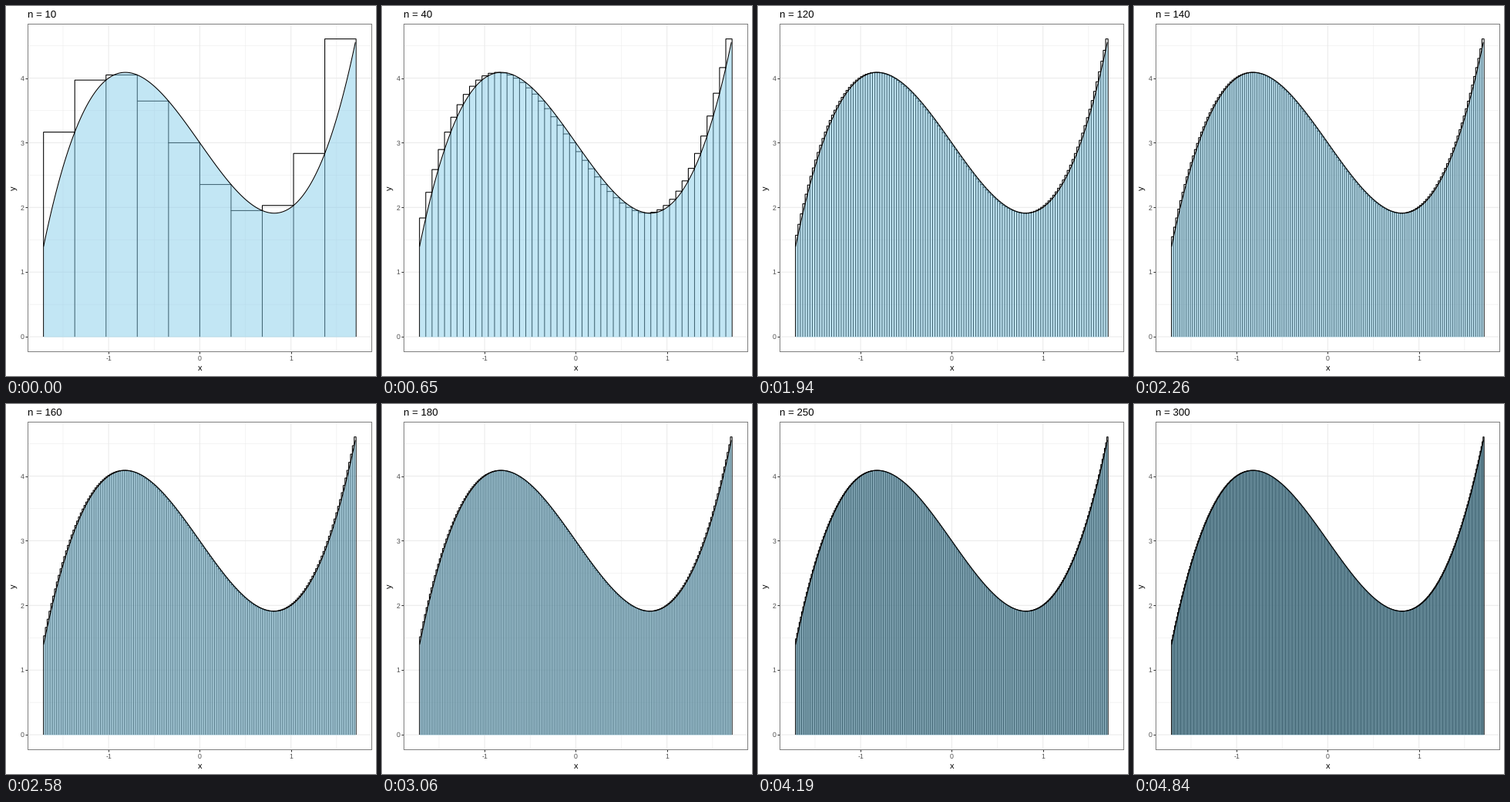
Write a matplotlib script that moves like this. It is 480 by 480 pixels and loops after 5 s.

```python
import numpy as np
import matplotlib.pyplot as plt
from matplotlib.animation import FuncAnimation

plt.rcParams["font.family"] = "Liberation Sans"
plt.rcParams["text.hinting"] = "none"
plt.rcParams["path.simplify"] = False

SIZE = 480
LEFT, RIGHT, TOP, BOTTOM = 28.4, 474.4, 23.4, 448.4
LINE = 1.07
EDGE = 1.7138
COUNTS = range(10, 311, 10)


def f(x):
    return x**3 - 2 * x + 3


def bar_lines(n):
    """Step outline of the right-hand sum, then the inner dividers."""
    edges = np.linspace(-EDGE, EDGE, n + 1)
    heights = f(edges[1:])
    xs = np.repeat(edges, 2)
    ys = np.concatenate([[0], np.repeat(heights, 2), [0]])
    inner = edges[1:-1]
    low = np.minimum(heights[:-1], heights[1:])
    gap = np.full(n - 1, np.nan)
    div_x = np.column_stack([gap, inner, inner]).ravel()
    div_y = np.column_stack([gap, np.zeros(n - 1), low]).ravel()
    return np.append(xs, div_x), np.append(ys, div_y)


fig = plt.figure(figsize=(SIZE / 72, SIZE / 72), dpi=72, facecolor="white")
ax = fig.add_axes([LEFT / SIZE, 1 - BOTTOM / SIZE,
                   (RIGHT - LEFT) / SIZE, (BOTTOM - TOP) / SIZE])
peak = f(EDGE)
ax.set_xlim(-1.1 * EDGE, 1.1 * EDGE)
ax.set_ylim(-0.05 * peak, 1.05 * peak)


def label(x, y, text, size, color="black", **kw):
    return fig.text(x / SIZE, 1 - y / SIZE, text, fontsize=size, color=color,
                    va="baseline", **kw)


def to_px(x, y):
    px, py = ax.transData.transform((x, y))
    return px, SIZE - py


# Panel: grid, ticks, border
ax.set_axisbelow(True)
ax.set_xticks([-1, 0, 1])
ax.set_yticks(range(5))
ax.set_xticks([-1.5, -0.5, 0.5, 1.5], minor=True)
ax.set_yticks(np.arange(0.5, 5), minor=True)
ax.tick_params(which="major", length=2.75, width=LINE, color="#333333",
               labelbottom=False, labelleft=False)
ax.tick_params(which="minor", length=0)
ax.grid(which="major", color="#ebebeb", lw=LINE)
ax.grid(which="minor", color="#ebebeb", lw=LINE / 2)
for axis in (ax.xaxis, ax.yaxis):
    for tick in axis.get_major_ticks() + axis.get_minor_ticks():
        tick.gridline.set_snap(False)
for spine in ax.spines.values():
    spine.set(color="#7f7f7f", linewidth=1)

for v in (-1, 0, 1):
    label(to_px(v, 0)[0], 459.9, str(v), 8.8, "#4d4d4d", ha="center")
for v in range(5):
    label(23.4, to_px(0, v)[1] + 3.2, str(v), 8.8, "#4d4d4d", ha="right")
label((LEFT + RIGHT) / 2, 472.6, "x", 11, ha="center")
label(13.9, (TOP + BOTTOM) / 2, "y", 11, ha="center", rotation=90,
      rotation_mode="anchor")
title = label(LEFT - 0.2, 15.2, "", 13.2, ha="left")

# Bars below the tinted area, curve on top
bars, = ax.plot([], [], color="black", lw=LINE, zorder=2, snap=False,
                solid_capstyle="butt", solid_joinstyle="miter")
curve_x = np.arange(-EDGE, EDGE, 0.01)
ax.fill_between(curve_x, f(curve_x), color="skyblue", alpha=0.5, lw=0,
                zorder=3)
ax.plot(curve_x, f(curve_x), color="black", lw=LINE, zorder=4,
        solid_capstyle="butt")


def update(i):
    # The title shows the previous step's count.
    bars.set_data(*bar_lines(COUNTS[i]))
    title.set_text(f"n = {COUNTS[max(i - 1, 0)]}")
    return bars, title


anim = FuncAnimation(fig, update, frames=len(COUNTS),
                     interval=5000 / len(COUNTS), repeat=True, repeat_delay=0)
plt.show()
```
